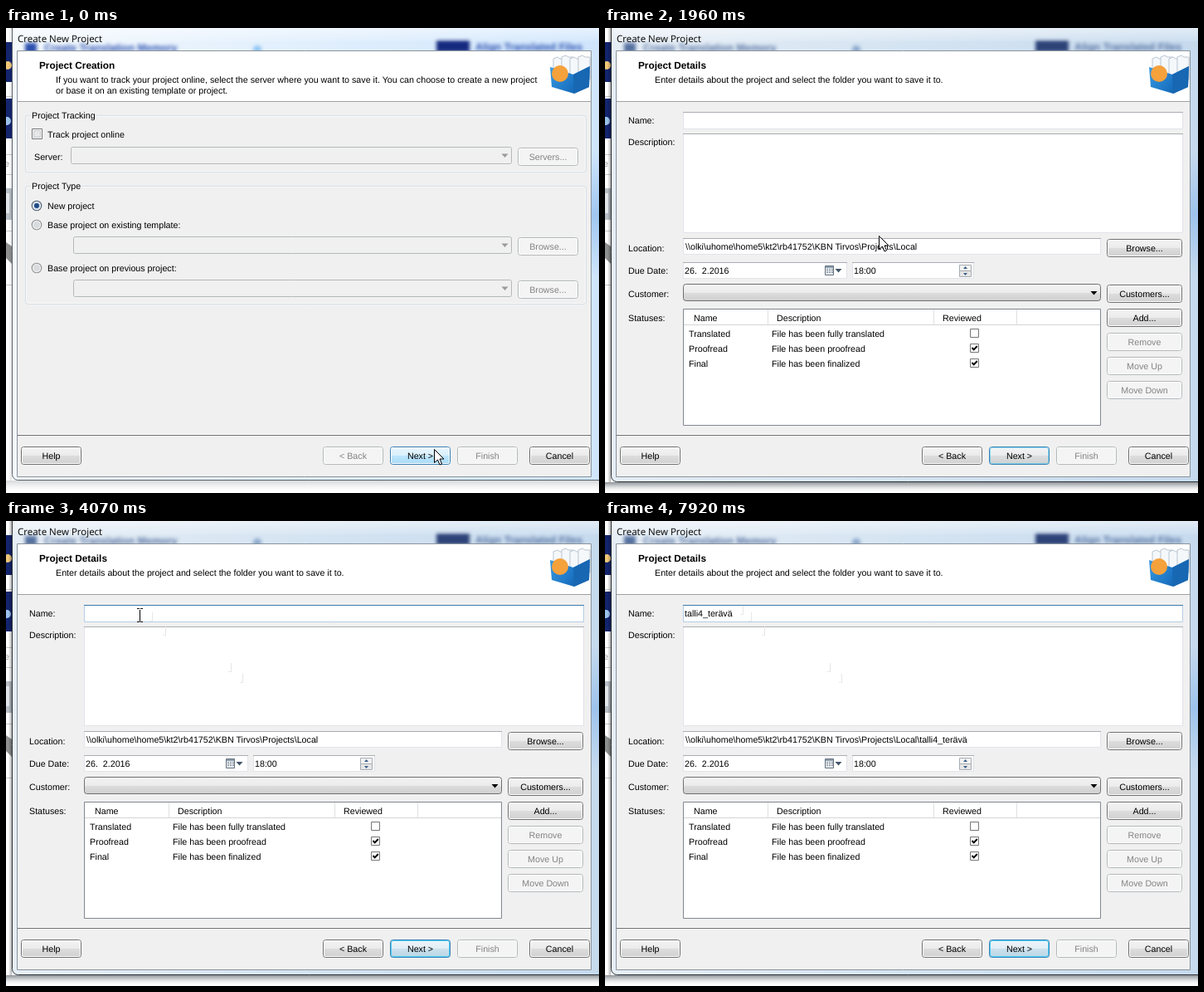
Write an HTML page with a canvas that moves like this. It is 715 px wide and 560 px high and loops after 7990 ms.

```html
<!DOCTYPE html>
<html lang="en">
<head>
<meta charset="utf-8">
<title>Create New Project</title>
<style>
html, body { margin: 0; width: 715px; height: 560px; overflow: hidden; background: #fff; }
canvas { display: block; }
</style>
</head>
<body>
<canvas id="stage" width="715" height="560"></canvas>
<script>
const ctx = document.getElementById('stage').getContext('2d');
const LOOP = 7990, STEP = 70;
const SANS = '"Liberation Sans", Arial, sans-serif';
const GREY = '#838383';
const PATH = '\\\\olki\\uhome\\home5\\kt2\\rb41752\\KBN Tirvos\\Projects\\Local';
const TYPED = 'talli4_terävä';
const KEY_TIMES = [4360, 4500, 4640, 4850, 4990, 5500, 6000, 6730, 6850, 6950, 7060, 7170, 7300];
const FOCUS = 3500, DETAILS = 1330, PRESS = 840;

// time, x, y of the pointer
const POINTER = [
  [0, 516, 507], [70, 516, 507], [140, 510, 509], [280, 510, 509], [350, 507, 510], [420, 504, 512],
  [1680, 504, 512], [1820, 420, 400], [1960, 330, 250], [2030, 285, 189], [2100, 271, 176],
  [2170, 192, 132], [2240, 176, 115], [2310, 166, 107], [3430, 166, 107], [3570, 161, 113]
];

function rect(x, y, w, h, fill) {
  ctx.fillStyle = fill;
  ctx.fillRect(x, y, w, h);
}

function box(x, y, w, h, border, fill, radius = 0) {
  ctx.beginPath();
  ctx.roundRect(x + .5, y + .5, w - 1, h - 1, radius);
  if (fill) { ctx.fillStyle = fill; ctx.fill(); }
  ctx.lineWidth = 1;
  ctx.strokeStyle = border;
  ctx.stroke();
}

function poly(points, fill, stroke) {
  ctx.beginPath();
  points.forEach(([x, y]) => ctx.lineTo(x, y));
  ctx.closePath();
  if (fill) { ctx.fillStyle = fill; ctx.fill(); }
  if (stroke) { ctx.lineWidth = 1; ctx.strokeStyle = stroke; ctx.stroke(); }
}

function disc(x, y, r, fill) {
  ctx.beginPath();
  ctx.arc(x, y, r, 0, Math.PI * 2);
  ctx.fillStyle = fill;
  ctx.fill();
}

// y is the middle of the line
function text(str, x, y, color = '#000', align = 'left', font = '10.7px ' + SANS) {
  ctx.font = font;
  ctx.textAlign = align;
  ctx.fillStyle = color;
  ctx.fillText(str, x, y + 4);
}

function gradient(x0, y0, x1, y1, ...stops) {
  const g = ctx.createLinearGradient(x0, y0, x1, y1);
  stops.forEach(([at, color]) => g.addColorStop(at, color));
  return g;
}

const glossy = (y, h, a, b, c, d) => gradient(0, y, 0, y + h, [0, a], [.5, b], [.5, c], [1, d]);

const SKINS = {
  normal: ['#707070', '#f4f4f4', '#ebebeb', '#dddddd', '#cfcfcf'],
  disabled: ['#b4b8ba', '#f4f4f4', '#f4f4f4', '#f4f4f4', '#f4f4f4'],
  hover: ['#3c7fb1', '#eaf6fd', '#d9f0fc', '#bee6fd', '#a7d9f5'],
  pressed: ['#2c628b', '#dcebf8', '#c5dff3', '#a3cbea', '#8fc0e4']
};

function button(label, x, y, w, skin = 'normal', glow = -1) {
  const h = 22, [edge, ...fill] = SKINS[skin];
  const isDefault = glow >= 0;
  box(x, y, w, h, isDefault ? '#3c7fb1' : edge, glossy(y, h, ...fill), 3);
  if (isDefault) {
    ctx.globalAlpha = glow * .55;
    box(x + 1, y + 1, w - 2, h - 2, '#3c7fb1', glossy(y, h, ...SKINS.hover.slice(1)), 2);
    ctx.globalAlpha = .55 + glow * .45;
    box(x + 1, y + 1, w - 2, h - 2, '#48d0f8', null, 2);
    ctx.globalAlpha = 1;
  } else {
    box(x + 1, y + 1, w - 2, h - 2, skin === 'pressed' ? '#9dbfd8' : '#fbfcfc', null, 2);
  }
  text(label, x + w / 2, y + 11, skin === 'disabled' ? GREY : '#000', 'center');
}

function arrowDown(x, y, color) {
  poly([[x - 4, y - 2], [x + 4, y - 2], [x, y + 2.5]], color);
}

function disabledCombo(x, y, w) {
  box(x, y, w, 21, '#b5b8ba', '#f0f0f0', 2);
  arrowDown(x + w - 8.5, y + 10.5, '#9a9a9a');
}

function field(x, y, w, h, tone = 'plain') {
  const [side, top] = {
    plain: ['#e2e3ea', '#abadb3'], hover: ['#c5daed', '#5794bf'],
    focus: ['#b5cfe7', '#3d7bad'], tint: ['#d4e3f0', '#8fb4d0']
  }[tone];
  box(x, y, w, h, side, '#fff');
  rect(x, y, w, 1, top);
}

function group(title, y, h) {
  box(23, y, 677, h, '#d5dfe5', null, 3);
  box(24, y + 1, 675, h - 2, '#fafafa', null, 3);
  ctx.font = '10.7px ' + SANS;
  rect(29, y - 1, ctx.measureText(title).width + 4, 4, '#f0f0f0');
  text(title, 31, y);
}

function checkBox(x, y, size, checked) {
  box(x, y, size, size, '#777', '#fff');
  if (!checked) return;
  ctx.beginPath();
  ctx.moveTo(x + 2.5, y + 5);
  ctx.lineTo(x + 4.7, y + 7.4);
  ctx.lineTo(x + 8.8, y + 3);
  ctx.lineWidth = 2;
  ctx.strokeStyle = '#000';
  ctx.stroke();
}

function radio(y, label, on) {
  disc(37, y, 6.3, on ? '#4a5b70' : '#8e8f8f');
  disc(37, y, 5.2, '#f4f6f7');
  disc(37, y, 4.2, on ? '#c5d6e6' : '#d9dcde');
  if (on) disc(37, y, 3, '#204a86');
  text(label, 50, y);
}

function backdrop(t) {
  const early = t < PRESS;
  rect(0, 0, 715, 560, '#fff');
  // slivers of the window underneath
  rect(0, 17, 7, 48, '#13246f');
  disc(2, 45, 5, '#f0c878');
  rect(0, 85, 7, 48, '#13246f');
  disc(1, 112, 5, '#9cc3ec');
  text('e', -2, 163, '#999');
  rect(0, 193, 7, 38, '#b9c0c7');
  rect(0, 199, 4, 24, '#e3e7ea');
  poly([[0, 258], [7, 263], [7, 284], [0, 277]], '#8f9090');
  for (const y of [82, 152, 176, 244, 309]) rect(0, y, 7, 1, '#c9c9c9');

  const bottom = early ? 545 : 547;
  const shade = early ? .18 : .5;
  rect(0, bottom, 715, 560 - bottom, gradient(0, bottom, 0, 560,
    [0, `rgba(30,40,50,${shade})`], [.5, `rgba(60,70,80,${shade * .3})`], [1, 'rgba(255,255,255,0)']));
  rect(3, 0, 4, bottom, gradient(3, 0, 7, 0, [0, 'rgba(0,0,0,0)'], [1, `rgba(0,0,0,${shade * .6})`]));

  ctx.save();
  ctx.beginPath();
  ctx.roundRect(7, -10, 720, bottom + 10, 7);
  ctx.clip();
  rect(7, 0, 708, 560, early
    ? gradient(7, 0, 715, 0, [0, '#f3f8fd'], [.45, '#e3f0fd'], [1, '#cfe5fc'])
    : gradient(7, 0, 715, 0, [0, '#e6eef6'], [.5, '#d5e4f2'], [1, '#c6daee']));
  rect(706, 150, 9, 150, gradient(0, 150, 0, 300,
    [0, 'rgba(140,185,235,0)'], [.5, 'rgba(140,185,235,.7)'], [1, 'rgba(140,185,235,0)']));
  ctx.filter = 'blur(2px)';
  const ink = early ? '#2b4fae' : '#56719f';
  const bold = 'bold 12.5px ' + SANS;
  rect(23, 18, 14, 12, ink);
  text('Create Translation Memory', 46, 24, ink, 'left', bold);
  disc(303, 26, 5, early ? '#8fc3f2' : '#8ba9cc');
  rect(519, 15, 40, 14, early ? '#15297f' : '#2d4378');
  text('Align Translated Files', 566, 23, ink, 'left', bold);
  ctx.filter = 'none';
  rect(7, 0, 708, 16, gradient(0, 0, 0, 16,
    [0, 'rgba(255,255,255,.5)'], [1, 'rgba(255,255,255,.1)']));
  ctx.restore();

  ctx.beginPath();
  ctx.roundRect(7.5, -10.5, 720, bottom + 10, 7);
  ctx.lineWidth = 1;
  ctx.strokeStyle = early ? '#59636d' : '#30363c';
  ctx.stroke();
  text('Create New Project', 14, 13, '#000', 'left', '11.5px "Open Sans", sans-serif');

  box(13, 27, 693, 514, '#8a939b', '#f0f0f0');
  rect(14, 28, 691, 60, '#fff');
  rect(14, 88, 691, 1, '#a0a0a0');
  rect(14, 489, 691, 1, '#fff');
  rect(14, 490, 691, 1, '#6e6e6e');
}

function folderBox() {
  for (let i = 0; i < 4; i++) {
    const x = 660 + i * 10, y = 37 - i % 2 * 2;
    poly([[x, y], [x + 5, y - 2], [x + 8, y], [x + 14, y], [x + 14, 62], [x, 58]], '#f5f8fb', '#b9c5d0');
  }
  poly([[656, 47], [684, 56], [704, 46], [703, 71], [685, 79], [658, 71]],
    gradient(656, 46, 700, 80, [0, '#3b9be0'], [.6, '#1c75c4'], [1, '#0e5297']));
  poly([[684, 56], [704, 46], [703, 71], [685, 79]], '#1767b3');
  disc(668, 55, 10, '#f5a13c');
}

function header(title, lines) {
  text(title, 40, 45, '#000', 'left', 'bold 11.8px ' + SANS);
  lines.forEach((line, i) => text(line, 60, 62 + i * 13));
  folderBox();
}

function creationPage() {
  header('Project Creation', [
    'If you want to track your project online, select the server where you want to save it. You can choose to create a new project',
    'or base it on an existing template or project.'
  ]);
  group('Project Tracking', 105, 69);
  checkBox(31, 121, 13, false);
  box(33, 123, 9, 9, '#c4c8cc', '#e6e8ea');
  text('Track project online', 50, 128);
  text('Server:', 34, 155);
  disabledCombo(78, 143, 532);
  button('Servers...', 617, 144, 73, 'disabled');
  group('Project Type', 190, 143);
  radio(214, 'New project', true);
  radio(237, 'Base project on existing template:', false);
  disabledCombo(81, 251, 529);
  button('Browse...', 617, 252, 73, 'disabled');
  radio(289, 'Base project on previous project:', false);
  disabledCombo(81, 303, 529);
  button('Browse...', 617, 304, 73, 'disabled');
}

function statusList() {
  box(94, 338, 504, 141, '#828790', '#fff');
  rect(95, 357, 502, 1, '#d5d5d5');
  for (const x of [196, 396, 496]) rect(x, 339, 1, 18, '#dedfe0');
  text('Name', 107, 349);
  text('Description', 207, 349);
  text('Reviewed', 407, 349);
  [['Translated', 'fully translated'], ['Proofread', 'proofread'], ['Final', 'finalized']]
    .forEach(([name, state], i) => {
      const y = 368 + i * 18;
      text(name, 101, y);
      text('File has been ' + state, 201, y);
      checkBox(440, y - 6, 11, i > 0);
    });
}

function iBeam(x, y, color) {
  rect(x, y - 6, 1, 14, color);
  for (const edge of [-8, 8]) {
    rect(x - 3, y + edge, 3, 1, color);
    rect(x + 1, y + edge, 3, 1, color);
  }
}

function pointerTraces(t) {
  const traces = [[2100, 285, 189], [2170, 271, 176], [2240, 192, 132], [2310, 176, 115], [4360, 166, 107]];
  for (const [from, x, y] of traces) {
    if (t < from) continue;
    rect(x, y - 5, 1, 11, '#e6e6e6');
    rect(x - 3, y + 5, 3, 1, '#e9e9e9');
  }
}

function detailsPage(t) {
  header('Project Details', ['Enter details about the project and select the folder you want to save it to.']);
  const count = KEY_TIMES.filter(k => k <= t).length;
  const typed = TYPED.slice(0, count);

  const labels = [['Name:', 111], ['Description:', 137], ['Location:', 265],
    ['Due Date:', 292], ['Customer:', 320], ['Statuses:', 349]];
  labels.forEach(([label, y]) => text(label, 28, y));

  field(94, 101, 603, 21, t >= FOCUS ? 'focus' : t >= 2240 ? 'hover' : 'plain');
  field(94, 127, 603, 120, t >= 2030 && t < FOCUS ? 'tint' : 'plain');
  pointerTraces(t);
  text(typed, 96, 111);
  if (t >= FOCUS) {
    const since = t - (count ? KEY_TIMES[count - 1] : FOCUS);
    const x = Math.round(97 + ctx.measureText(typed).width);
    if (since % 1060 < 530) rect(x, 105, 1, 13, '#000');
  }

  field(94, 253, 504, 20);
  text(PATH + (count ? '\\' + typed : ''), 97, 263);
  button('Browse...', 605, 254, 91);

  field(94, 282, 198, 20);
  text('26.  2.2016', 96, 292);
  box(265, 286, 11, 12, '#65717e', '#e9eef3');
  rect(266, 287, 9, 2, '#8b9cad');
  for (let i = 0; i < 9; i++) rect(267 + i % 3 * 3, 290 + Math.floor(i / 3) * 2, 2, 1, '#7d8792');
  arrowDown(281.5, 292, '#44556a');
  field(298, 282, 147, 20);
  text('18:00', 300, 292);
  box(427, 285, 15, 8, '#a5abb0', '#f3f3f3');
  box(427, 292, 15, 8, '#a5abb0', '#e6e6e6');
  poly([[432, 290], [437, 290], [434.5, 287]], '#3b5f88');
  poly([[432, 295], [437, 295], [434.5, 298]], '#3b5f88');

  box(94, 308, 504, 21, '#707070', glossy(308, 21, ...SKINS.normal.slice(1)), 3);
  arrowDown(589.5, 319, '#000');
  button('Customers...', 605, 309, 91);
  statusList();
  button('Add...', 605, 338, 91);
  ['Remove', 'Move Up', 'Move Down'].forEach((label, i) => button(label, 605, 367 + i * 29, 91, 'disabled'));
}

function footer(t) {
  button('Help', 18, 504, 73);
  button('< Back', 382, 504, 73, t < 1540 ? 'disabled' : 'normal');
  const pulse = t < 3440 ? .1 : .55 + .45 * Math.cos((t - 4070) / 1270 * Math.PI * 2);
  if (t < PRESS) button('Next >', 463, 504, 73, 'hover');
  else if (t < 1540) button('Next >', 463, 504, 73, 'pressed');
  else if (t < 1750) button('Next >', 463, 504, 73, 'hover');
  else button('Next >', 463, 504, 73, 'normal', pulse);
  button('Finish', 544, 504, 73, 'disabled');
  button('Cancel', 631, 504, 73);
}

function pointerAt(t) {
  const i = POINTER.findIndex(p => p[0] > t);
  if (i < 0) return POINTER[POINTER.length - 1].slice(1);
  const [t0, x0, y0] = POINTER[i - 1], [t1, x1, y1] = POINTER[i];
  const k = (t - t0) / (t1 - t0);
  return [Math.round(x0 + (x1 - x0) * k), Math.round(y0 + (y1 - y0) * k)];
}

function pointer(t) {
  if (t >= KEY_TIMES[0]) return;
  const [x, y] = pointerAt(t);
  if (y < 247) return iBeam(x, y, '#000');
  const shape = [[0, 0], [0, 16], [4, 12.5], [6.5, 18.5], [9, 17.5], [6.5, 11.5], [11.5, 11.5]];
  poly(shape.map(([dx, dy]) => [x + dx + .5, y + dy + .5]), '#fff', '#000');
}

function draw(t) {
  backdrop(t);
  if (t < DETAILS) creationPage();
  else detailsPage(t);
  footer(t);
  pointer(t);
}

ctx.textRendering = 'geometricPrecision';
const start = performance.now();
function tick() {
  const t = (performance.now() - start) % LOOP;
  draw(Math.floor(t / STEP) * STEP);
  requestAnimationFrame(tick);
}
tick();
</script>
</body>
</html>
```
